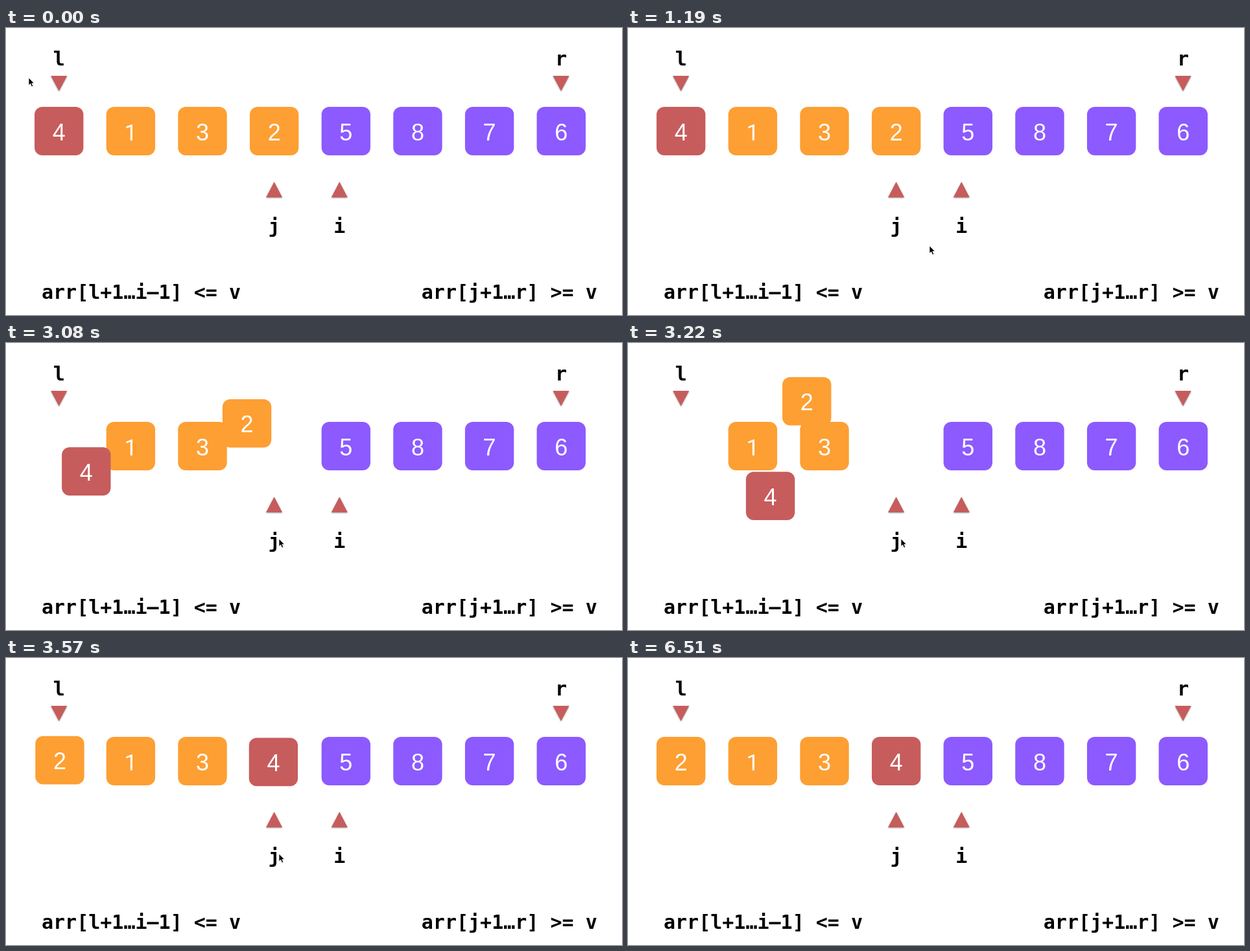
An HTML page that plays this animation: 950 by 444 pixels, repeating every 6580 ms.

```html
<!DOCTYPE html>
<html lang="en">
<head>
<meta charset="utf-8">
<title>Partition swap</title>
<style>
  html, body { margin: 0; width: 100%; height: 100%; overflow: hidden; background: #fff; }
  svg { display: block; width: 100vw; height: 100vh; }
  .code { font: bold 30px "DejaVu Sans Mono", monospace; white-space: pre; }
  .digit { font: 36px "Liberation Sans", sans-serif; fill: #fff; text-anchor: middle; }
  .one { font: 35px Roboto, sans-serif; }
  .mid { text-anchor: middle; }
  .mark { fill: #c75c5c; filter: drop-shadow(0 1px 1px rgba(0, 0, 0, .4)); }
</style>
</head>
<body>
<svg id="stage" viewBox="0 0 950 444"></svg>
<script>
const LOOP = 6580, STEP = 70;
const RED = '#c75c5c', ORANGE = '#fd9f33', PURPLE = '#8c5aff';
const FIRST = 81.7, PITCH = 110.65, ROW = 159.5;
const SWAP = { start: 2908, length: 692, from: 0, to: 3 };
const CURSOR_OFF = 3780;

// Pointer stops: time, x, y
const stops = [
  [0, 35, 77], [280, 24, 22], [700, 9, 110],
  [1190, 465, 337], [1400, 436, 306], [1680, 421, 303]
];

const stage = document.getElementById('stage');

function add(parent, name, attrs, text) {
  const el = document.createElementNS('http://www.w3.org/2000/svg', name);
  for (const key in attrs) el.setAttribute(key, attrs[key]);
  if (text) el.textContent = text;
  parent.appendChild(el);
  return el;
}

const slotX = i => FIRST + PITCH * i;
const place = (el, x, y) => el.setAttribute('transform', `translate(${x.toFixed(2)} ${y.toFixed(2)})`);

function label(text, x, y, mid = true) {
  add(stage, 'text', { x, y, class: mid ? 'code mid' : 'code' }, text);
}

function marker(x, base, tip) {
  add(stage, 'path', { class: 'mark', d: `M${x - 12.5} ${base}h25L${x} ${tip}z` });
}

function tile(digit, slot, fill) {
  const g = add(stage, 'g', {});
  add(g, 'rect', { x: -37.7, y: -37.4, width: 75.4, height: 74.8, rx: 12, fill });
  add(g, 'text', { y: 14, class: digit === 1 ? 'digit one' : 'digit' }, String(digit));
  place(g, slotX(slot), ROW);
  return g;
}

label('l', 81.7, 58);
label('r', 856, 58);
label('j', 413.5, 317);
label('i', 514.3, 317);
label('arr[l+1…i–1] <= v', 55, 419, false);
label('arr[j+1…r] >= v', 640.8, 419, false);
marker(81.7, 74, 97.5);
marker(856, 74, 97.5);
marker(413.6, 262, 238);
marker(514.3, 262, 238);

tile(1, 1, ORANGE);
tile(3, 2, ORANGE);
[5, 8, 7, 6].forEach((d, i) => tile(d, 4 + i, PURPLE));
const small = tile(2, SWAP.to, ORANGE);
const pivot = tile(4, SWAP.from, RED);
const cursor = add(stage, 'path', {
  d: 'M0 0V11.6L2.7 9.2L4.6 13.7L6.7 12.8L4.8 8.5H8.3Z',
  fill: '#000', stroke: '#fff', 'stroke-width': .7
});

const clamp = v => Math.min(1, Math.max(0, v));
const ease = u => (1 - Math.cos(Math.PI * clamp(u))) / 2;

// Curved path from slot a to slot b, bulging by lift pixels
function arc(el, a, b, lift, u) {
  const v = 1 - u, c = .265;
  const along = 3 * u * v * v * c + 3 * u * u * v * (1 - c) + u * u * u;
  place(el, slotX(a + (b - a) * along), ROW + 4 * lift * u * v);
}

function pointer(t) {
  let i = 0;
  while (i < stops.length - 2 && t >= stops[i + 1][0]) i++;
  const [t0, x0, y0] = stops[i], [t1, x1, y1] = stops[i + 1];
  const u = ease((t - t0) / (t1 - t0));
  place(cursor, x0 + (x1 - x0) * u, y0 + (y1 - y0) * u);
  cursor.setAttribute('visibility', t < CURSOR_OFF ? 'visible' : 'hidden');
}

function draw(time) {
  const t = Math.floor(time % LOOP / STEP) * STEP;
  const u = ease((t - SWAP.start) / SWAP.length);
  arc(pivot, SWAP.from, SWAP.to, 79, u);
  arc(small, SWAP.to, SWAP.from, -71, u);
  pointer(t);
}

const begin = performance.now();
function tick() {
  draw(performance.now() - begin);
  requestAnimationFrame(tick);
}
tick();
</script>
</body>
</html>
```
